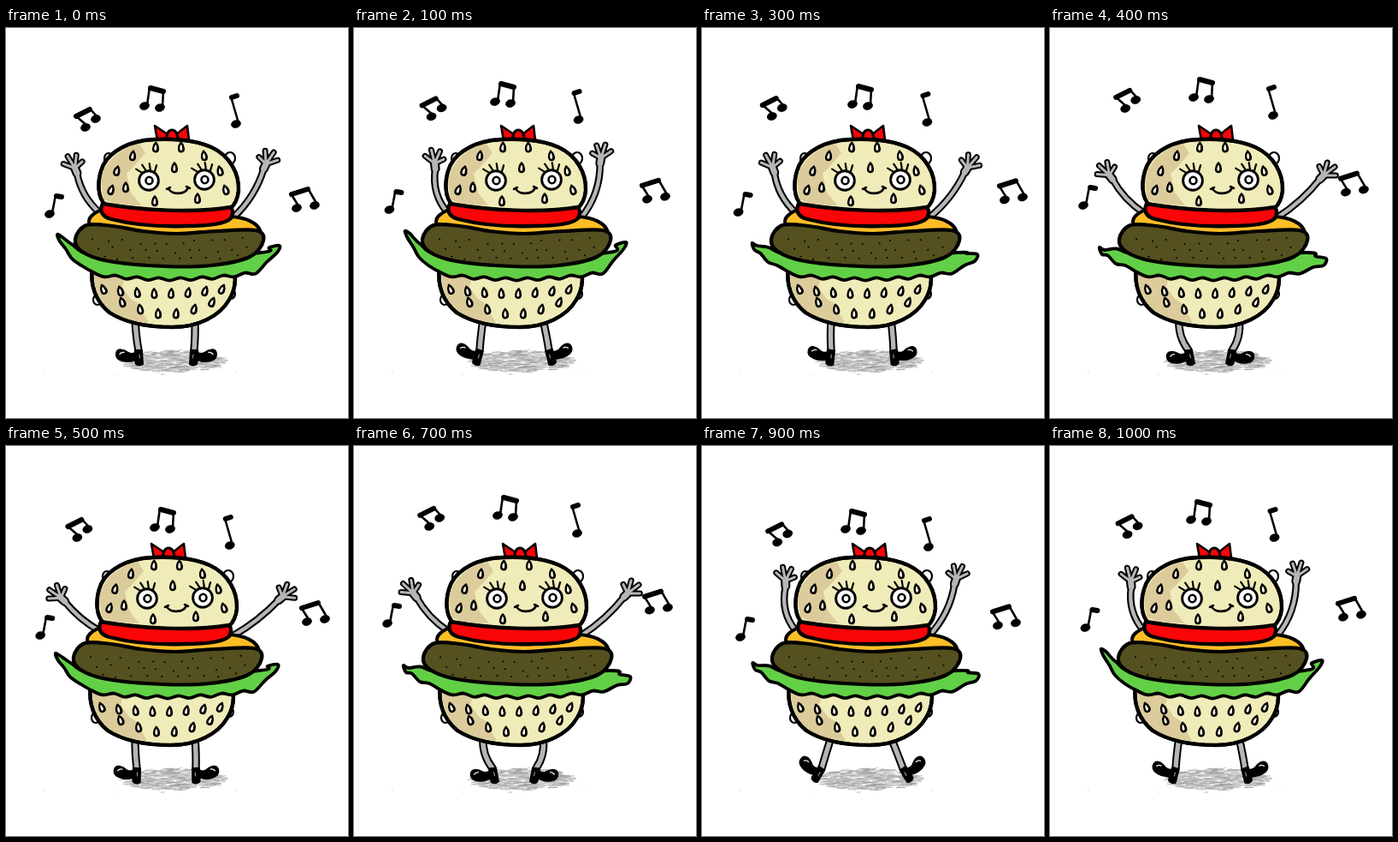
These frames come from a looping animation (400x455 px, 1.1 s). An HTML page:

```html
<!DOCTYPE html>
<html lang="en">
<head>
<meta charset="utf-8">
<title>Dancing burger</title>
<style>
  html, body { margin: 0; width: 100%; height: 100%; overflow: hidden; background: #fff; }
  svg { display: block; width: 100vw; height: 100vh; }
  .ink { fill: none; stroke: #000; stroke-linecap: round; stroke-linejoin: round; }
</style>
</head>
<body>
<svg id="stage" viewBox="0 0 400 455"></svg>
<script>
const INK = '#000', BUN = '#f0ecb9', TAN = '#dccb9b', GREY = '#b6b6b6';
const RED = '#fa0508', CHEESE = '#fdbd25', PATTY = '#54501f', LEAF = '#62d046';
const STEP = 100, LAST = 5;

// one value per pose; the dance runs up the list, rests one step and runs back
const DANCE = {
  stance: [0, 8, 15, 4, -7, 2],
  droop: [0, -4, 12, 10, 15, 1],
  left: [30, 16, 13, 28, 43, 50],
  right: [32, 19, 26, 38, 48, 52],
  lean: [0, -1, 1, 0, 0, -2],
  hop: [0, -5, 6, -2, -10, 4],
  outward: [0, 3, 6, 14, 6, 12],
  back: [0, -8, -5, -7, -10, -9]
};

const path = (d, fill, width = 4) =>
  `<path class="ink" d="${d}" style="fill:${fill};stroke-width:${width}"/>`;
const line = (d, width, color = INK) =>
  `<path class="ink" d="${d}" style="stroke:${color};stroke-width:${width}"/>`;
const patch = (d, color) => `<path d="${d}" fill="${color}"/>`;
const oval = (x, y, rx, ry, width) =>
  `<ellipse class="ink" cx="${x}" cy="${y}" rx="${rx}" ry="${ry}" style="fill:#fff;stroke-width:${width}"/>`;
const move = (x, y, body, turn = 0) => `<g transform="translate(${x} ${y}) rotate(${turn})">${body}</g>`;
const each = (n, make) => Array.from({ length: n }, (_, i) => make(i));

// point at a distance from x, y; the angle runs clockwise from straight up
function ray(x, y, deg, len) {
  const a = deg * Math.PI / 180;
  return [x + Math.sin(a) * len, y - Math.cos(a) * len];
}

function random(seed) {
  return () => (seed = (seed * 16807) % 2147483647) / 2147483647;
}

// closed smooth curve through points
function smooth(pts) {
  const at = i => pts[(i + pts.length) % pts.length];
  let d = `M${pts[0]}`;
  pts.forEach((p, i) => {
    const a = at(i - 1), q = at(i + 1), b = at(i + 2);
    const c = [0, 1].map(k => p[k] + (q[k] - a[k]) / 6);
    const e = [0, 1].map(k => q[k] - (b[k] - p[k]) / 6);
    d += `C${c} ${e} ${q}`;
  });
  return d + 'Z';
}

const seed = (x, y, turn = 0) => move(x, y,
  path('M0 -5.6C4 -1 3.8 5 0 5C-3.8 5 -4 -1 0 -5.6Z', '#fffbe2', 2.4) +
  line('M1.7 -1Q3 2 1.2 4', 1.6), turn);

function shadow() {
  const rnd = random(77);
  let soft = '', dark = '';
  for (let i = 0; i < 480; i++) {
    const a = rnd() * Math.PI * 2, r = Math.sqrt(rnd());
    const x = 196 + Math.cos(a) * r * 60, y = 389 + Math.sin(a) * r * 12.5;
    const len = 3 + rnd() * 10;
    const d = `M${(x - len / 2).toFixed(1)} ${y.toFixed(1)}l${len.toFixed(1)} ${(rnd() * 2 - 1.4).toFixed(1)}`;
    if (i % 4) soft += d; else dark += d;
  }
  return line(soft, 1, '#c6c6c6') + line(dark, .7, '#999') +
    line('M45 402h.1M127 404h.1M269 402h.1M181 404h4', 1, '#bbb');
}

function arm(raise, side) {
  const [sx, sy, len] = side < 0 ? [110, 216, 54] : [266, 221, 67];
  const [wx, wy] = ray(sx, sy, side * raise, len);
  const ex = (sx + wx) / 2 + side * (16 - raise / 4), ey = (sy + wy) / 2 + 4;
  const limb = `M${sx} ${sy}Q${ex} ${ey} ${wx} ${wy}`;
  const out = 1.2 * raise - 13;
  const [px, py] = ray(wx, wy, side * out, 6);
  const fingers = each(4, i =>
    `M${px} ${py}L${ray(wx, wy, side * (out - 48 + 27 * i), 22.5 - 2.4 * (i - 1.8) ** 2)}`).join('');
  const palm = `M${wx} ${wy}L${px} ${py}`;
  return line(limb, 8.6) + line(palm, 11) + line(fingers, 7) +
    line(limb, 4.4, GREY) + line(palm, 6.8, GREY) + line(fingers, 3, GREY);
}

function leg(stance, side) {
  const [hip, ankle] = side < 0 ? [151, 155] : [221, 220];
  const x = ankle + side * stance, y = 376;
  const knee = (hip + x) / 2 + side * Math.max(1, -stance);
  const limb = `M${hip} 340Q${knee} 360 ${x} ${y}`;
  const lift = stance > 0 ? stance * 2.3 : stance;
  const shoe = path('M-4 0L4 0L5 16Q1 19 -3 16L-4 11C-12 15 -27 13 -26 4C-25 -3 -17 -1 -12 3Q-8 5 -4 3Z', INK, 2) +
    line('M-22 4.5Q-20 2 -17 2.5', 1.3, '#fff') + line('M1 5l.4 4', 1, '#aaa');
  return line(limb, 9.4) + line(limb, 5.4, GREY) +
    `<g transform="translate(${x} ${y}) scale(${-side} 1) rotate(${lift})">${shoe}</g>`;
}

function leaf(droop) {
  const lx = 60 - droop * .15, ly = 241 + droop;
  const rx = 321 + droop * .2, ry = 254 + droop;
  const frill = each(16, i => {
    const x = 292 - i * 12.6;
    return [x, 280 + 13 * Math.sin((x - 75) / 74) ** .6 + (i % 2 ? -1.6 : 1.6)];
  });
  return path(smooth([
    [lx, ly], [lx + 6, ly + 3], [78, 253 + droop * .3], [100, 264], [180, 268], [298, 262],
    [rx - 13, ry + 2 - droop * .3], [rx - 1, ry], [rx - 4, ry + 8], [rx - 16, 273 + droop * .4],
    ...frill, [88, 277], [77, 269 + droop * .4], [lx + 10, ly + 17 - droop * .5], [lx + 3, ly + 8]
  ]), LEAF, 3.8);
}

const bow = () =>
  path('M174 114L189 124L188 131L177 131Z', RED, 2.6) +
  path('M212 114L199 124L200 131L214 131Z', RED, 2.6) +
  path('M188 131C186 115 202 115 201 131Z', RED, 3);

function face() {
  const eye = (x, y) => oval(x, y, 11.4, 11.2, 2.9) + oval(x + .5, y, 4, 4.2, 2.6) +
    line(each(4, i => {
      const deg = -42 + 25 * i;
      return `M${ray(x, y, deg, 13)}L${ray(x, y, deg - 6, 20)}`;
    }).join(''), 2.2);
  return eye(167, 178) + eye(232, 177) +
    line('M190 187C193 195 210 195 213 186M188 188l4 -2M211 185l4 2', 2.6);
}

function topBun() {
  const shape = 'M116 206C107 198 107 180 111 167C116 148 137 135 162 131' +
    'C190 128 220 130 240 139C262 149 273 170 272 190C271 199 268 206 262 211C220 217 160 213 116 206Z';
  const rim = each(8, i => {
    const deg = -90 + i * 180 / 7, [x, y] = ray(0, 0, deg, 1);
    return seed(190 + x * 67, 189 + y * 51, -deg / 5);
  });
  return oval(120, 152, 5, 6, 2.2) + oval(262, 152, 6, 7, 2.2) + path(shape, BUN) +
    patch('M114 200L111 178C115 155 134 140 156 135L163 146L150 161L141 170L146 192L158 207L128 205Z', TAN) +
    path(shape, 'none', 4.4) + rim.join('') +
    seed(140, 186) + seed(197, 163) + seed(174, 202) + seed(224, 199) + face();
}

function bottomBun() {
  const shape = 'M101 280C98 300 105 319 121 332C140 344 166 349 195 349' +
    'C225 349 250 336 261 317C268 306 269 292 267 280Z';
  const upper = each(8, i => seed(114 + i * 19.8, 305 + 5 * Math.sin(i * .45), -22 + i * 6.5));
  const lower = each(6, i => seed(136 + i * 21, 320 + 14 * Math.sin(i * Math.PI / 5), -18 + i * 8));
  return oval(107, 317, 5, 6, 2.2) + oval(263, 310, 5, 6, 2.2) + path(shape, BUN) +
    patch('M103 288L140 288L136 302L146 316L153 320L167 344L146 341C118 334 104 314 103 288Z', TAN) +
    path(shape, 'none', 4.4) + upper.join('') + lower.join('');
}

function fillings() {
  const rnd = random(19);
  const dots = each(33, i => {
    const x = 101 + i % 11 * 17 + Math.floor(i / 11) * 6 + rnd() * 6;
    const y = 243 + Math.floor(i / 11) * 10 + 5 * Math.sin((x - 90) / 66) + rnd() * 5;
    return `M${x.toFixed(1)} ${y.toFixed(1)}h.1`;
  });
  return path('M114 211C105 215 97 219 97 226C98 236 110 240 130 242L280 244L298 238C295 228 282 221 262 220Z', CHEESE) +
    path('M113 205C109 213 112 220 123 223C150 230 180 232 210 231C235 231 256 229 263 222C266 217 266 213 263 209C220 216 160 213 113 205Z', RED, 4.4) +
    path(smooth([[81, 246], [94, 230], [125, 231], [160, 237], [200, 240], [245, 237],
      [292, 236], [301, 248], [285, 267], [240, 277], [185, 278], [120, 272], [89, 261]]), PATTY, 4.2) +
    line(dots.join(''), 2);
}

// stems run from top to bottom; a lone stem gets a short flag
function note(stems, flag) {
  const heads = stems.map(([, , x, y]) =>
    move(x - 3, y + 1, '<ellipse rx="6" ry="4.7"/>', -18)).join('');
  const [x, y] = stems[0], [fx, fy] = flag || stems[1];
  return line(stems.map(([a, b, c, d]) => `M${a} ${b}L${c} ${d}`).join(''), 2.6) +
    line(`M${x + 1} ${y + 1}L${fx} ${fy + 1}`, 6) + heads;
}

const NOTES = [
  { art: note([[81, 102, 96, 115], [98, 94, 108, 105]]), path: 'outward', gain: -.8, rise: -13 },
  { art: note([[168, 69, 165, 90], [184, 73, 183, 92]]), path: 'outward', gain: 1, rise: 0 },
  { art: note([[263, 80, 272, 111]], [270, 78]), path: 'back', gain: .8, rise: 0 },
  { art: note([[58, 195, 54, 216]], [65, 196]), path: 'back', gain: 1.2, rise: 0 },
  { art: note([[333, 193, 343, 209], [353, 187, 364, 206]]), path: 'outward', gain: 1, rise: -9 }
];

function draw(p) {
  const now = key => DANCE[key][p];
  const notes = NOTES.map(n =>
    move(now(n.path) * n.gain, now('hop') + n.rise * Math.cbrt(p / LAST), n.art)).join('');
  const limbs = arm(now('left'), -1) + arm(now('right'), 1) +
    leg(now('stance'), -1) + leg(now('stance'), 1);
  const body = bottomBun() + leaf(now('droop')) + move(now('lean'), 0, bow()) + topBun() + fillings();
  return `<g visibility="hidden">${notes}${limbs}${move(now('lean'), 0, body)}</g>`;
}

const stage = document.getElementById('stage');
stage.innerHTML = shadow() + `<g id="poses">${each(LAST + 1, draw).join('')}</g>`;
const poses = [...document.getElementById('poses').children];
const start = performance.now();

function tick() {
  const beat = Math.floor(Math.max(0, performance.now() - start) / STEP) % (2 * LAST + 1);
  const current = Math.min(beat, 2 * LAST + 1 - beat);
  poses.forEach((g, i) => g.setAttribute('visibility', i === current ? 'visible' : 'hidden'));
  requestAnimationFrame(tick);
}
tick();
</script>
</body>
</html>
```
